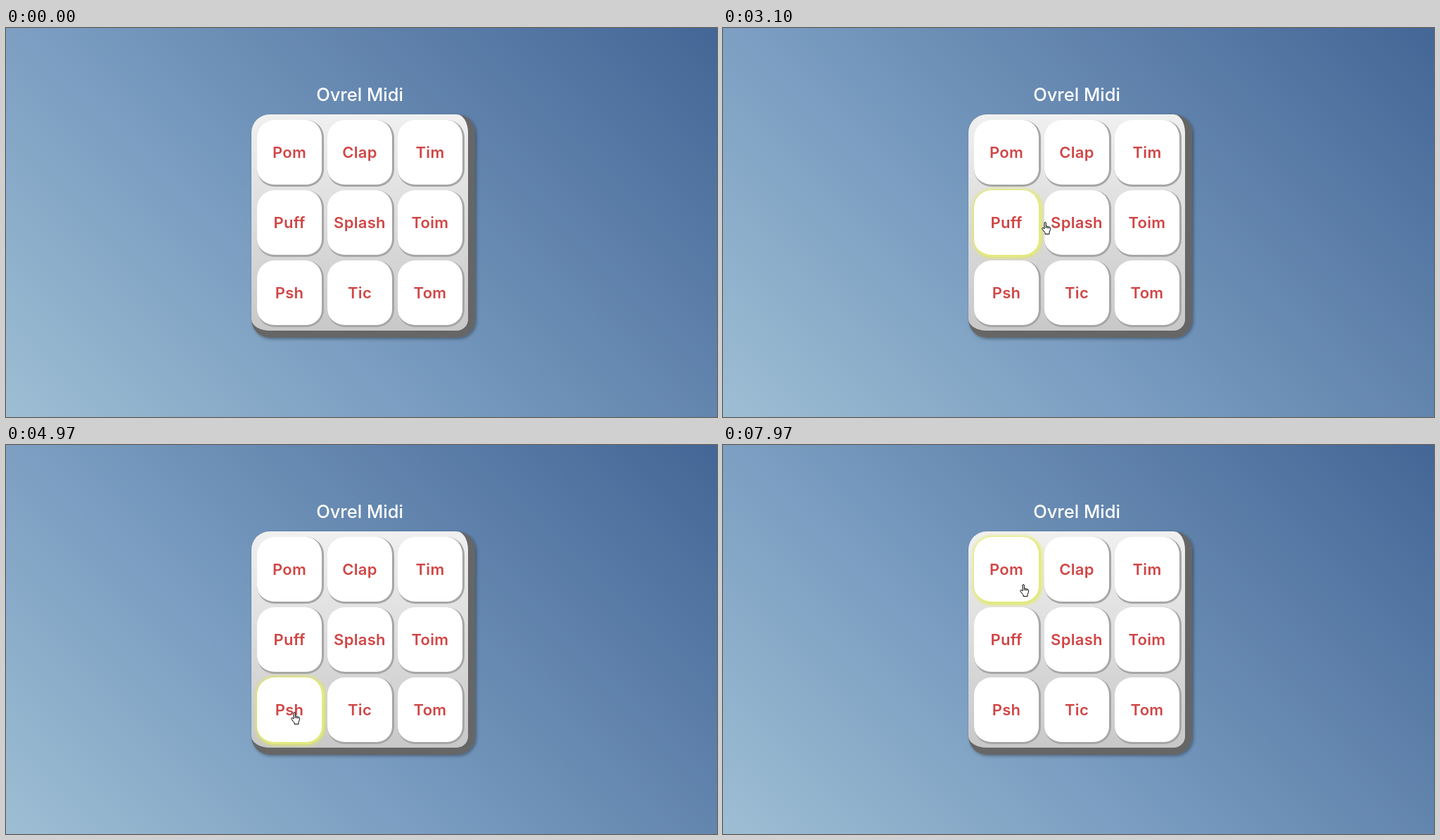
Animation, 1011 px wide and 554 px high, one loop 8000 ms. Source, as an HTML page:

```html
<!DOCTYPE html>
<html lang="en">
<head>
<meta charset="utf-8">
<title>Sound pads</title>
<style>
  html, body { margin: 0; width: 100%; height: 100%; overflow: hidden; }
  body {
    position: relative;
    background: linear-gradient(45deg, #9dbed3, #7a9dc1 38%, #446696);
    font-family: Inter, sans-serif;
  }
  h1 {
    position: absolute; left: 303px; top: 79px; width: 400px; margin: 0;
    font-size: 25.5px; font-weight: 500; line-height: 32px;
    text-align: center; color: #fff;
  }
  #panel {
    position: absolute; left: 349px; top: 123px; width: 308px; height: 308px;
    border: solid #666; border-width: 0 10px 10px 0; border-radius: 26px;
    background: linear-gradient(#f0f0f0, #c8c8c8);
    box-shadow: 2px 2px 4px rgba(0, 0, 0, .35);
  }
  .pad {
    position: absolute; width: 92px; height: 92px;
    border: solid #a6a6a6; border-width: 0 3px 3px 0; border-radius: 25px;
    background: #fff; color: #d04646;
    font-size: 22px; font-weight: 600; line-height: 92px;
    letter-spacing: .3px; text-align: center;
  }
  .pad.active { border-color: #e2ea80; box-shadow: 0 0 5px 1px #e3ec50; }
  #cursor {
    position: absolute; left: 0; top: 0; width: 14px; height: 19px;
    overflow: visible; fill: #fff; stroke: #000; stroke-linejoin: round;
  }
</style>
</head>
<body>
<h1>Ovrel Midi</h1>
<div id="panel"></div>
<svg id="cursor">
  <g id="hand">
    <path d="M4 10V1.8a1.1 1.1 0 0 1 2.3 0V6.3q1.2-.7 2 .4 1.2-.5 1.9.6 2-.4 2.2 1.4V11.5L11 14.8V17.5H5V15.5L1 10.7C0 8.8 2 8 3 9.2Z"/>
    <path fill="none" d="M6.3 6.5V9M8.3 6.8V9.3M10.2 7.4V9.6"/>
  </g>
  <path id="arrow" d="M.5.5V14l3-3 2 4.6 2-.9-2-4.4h4.2Z"/>
</svg>
<script>
const LOOP = 8000, TICK = 1000 / 15, PITCH = 100;
const $ = id => document.getElementById(id);
const column = i => i % 3, row = i => Math.floor(i / 3);

const pads = 'Pom Clap Tim Puff Splash Toim Psh Tic Tom'.split(' ').map((name, i) => {
  const pad = document.createElement('div');
  pad.className = 'pad';
  pad.textContent = name;
  pad.style.left = 8 + column(i) * PITCH + 'px';
  pad.style.top = 8 + row(i) * PITCH + 'px';
  $('panel').append(pad);
  return pad;
});

// Pads are pressed at a steady beat after the first one
const order = [0, 1, 2, 3, 4, 5, 7, 6, 8];
const presses = order.map((pad, i) => ({ pad, time: i ? 1245 + 522 * i : 900 }));
presses.push({ pad: 0, time: 7900 });

// The pointer rests near each pad's centre, swaying a little from pad to pad
const restX = i => 394 + column(order[i]) * PITCH - 14 * Math.cos(i * 2 * Math.PI / 5);
const restY = i => 180 + row(order[i]) * PITCH + 9 * Math.cos((i - 1) * Math.PI / 4);

const tour = [{ time: 500, x: 148, y: 237 }, { time: 640, x: restX(0), y: restY(0) }];
for (let i = 1; i < order.length; i++) {
  const { time } = presses[i];
  tour.push({ time: time - 320, x: restX(i - 1), y: restY(i - 1) },
            { time: time - 60, x: restX(i), y: restY(i) });
}
tour.push({ time: 5500, x: 589, y: 371 }, { time: 5690, x: 441, y: 376 });
const comeback = [{ time: 7500, x: 200, y: 261 }, { time: 7960, x: 422, y: 198 },
                  { time: LOOP, x: 422, y: 198 }];

const ease = f => f * (2 - f);

function pointerAt(t) {
  for (const path of [tour, comeback]) {
    const next = path.findIndex(p => p.time > t);
    if (next < 1) continue;
    const a = path[next - 1], b = path[next];
    const f = ease((t - a.time) / (b.time - a.time));
    return { x: Math.round(a.x + (b.x - a.x) * f), y: Math.round(a.y + (b.y - a.y) * f) };
  }
}

const insidePad = v => v >= 0 && v < 3 * PITCH && v % PITCH < 95;
const show = (id, on) => $(id).style.display = on ? '' : 'none';

function draw(time) {
  // Fifteen steps a second, offset by half a step
  const t = (Math.floor(time / TICK - .49) + .5) * TICK + .5;

  const press = presses.filter(p => p.time <= t).pop();
  pads.forEach((pad, i) => pad.classList.toggle('active', press?.pad === i));

  const spot = pointerAt(t);
  show('cursor', spot);
  if (!spot) return;
  const overPad = insidePad(spot.x + 5 - 357) && insidePad(spot.y - 131);
  $('cursor').style.transform = `translate(${spot.x}px, ${spot.y}px)`;
  show('hand', overPad);
  show('arrow', !overPad);
}

let start;
function loop(now) {
  start ??= now;
  draw((now - start) % LOOP);
  requestAnimationFrame(loop);
}
requestAnimationFrame(loop);
</script>
</body>
</html>
```
